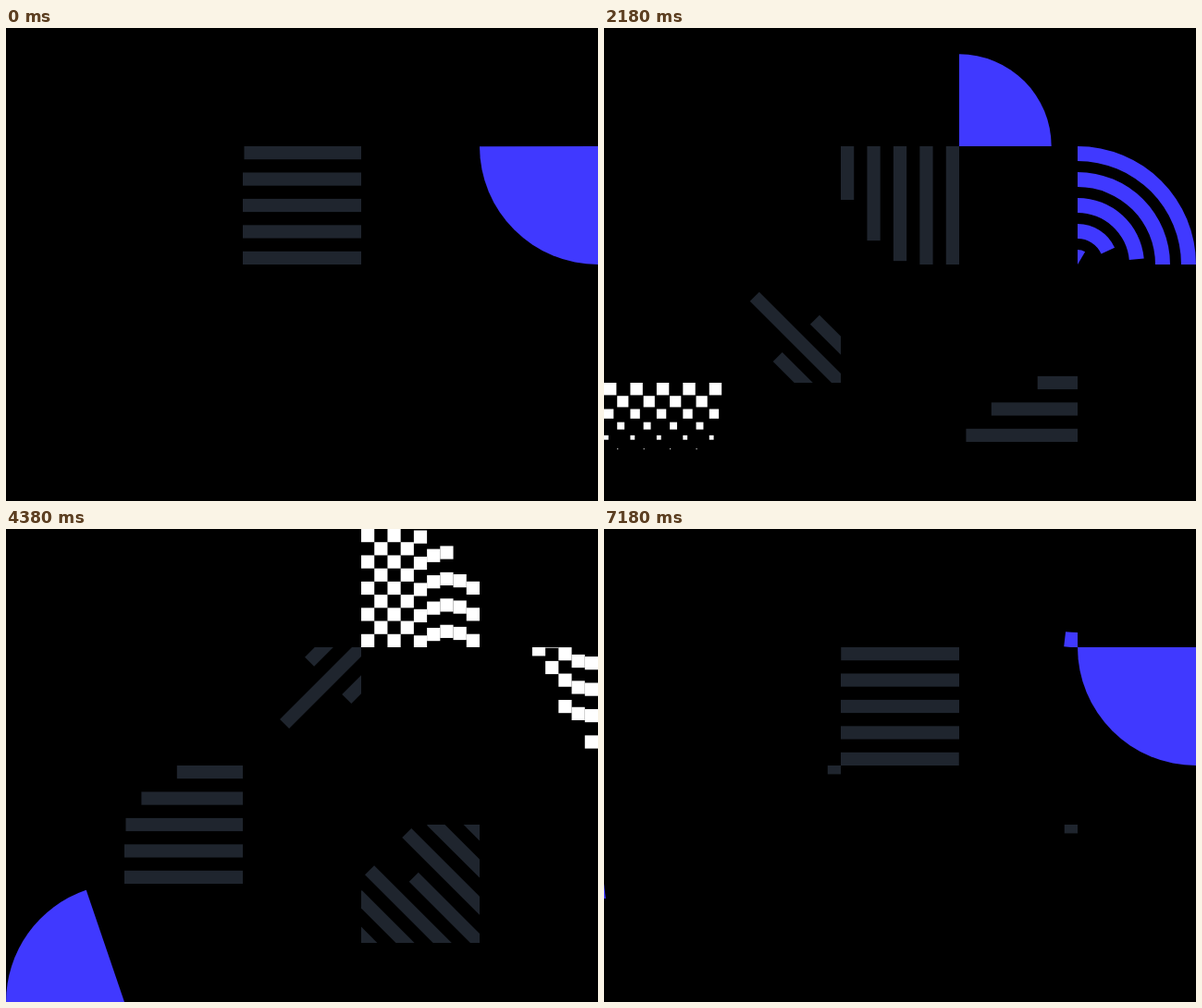
Recreate the animation shown at these times as an HTML page with a canvas. Size 640 by 512 pixels, loop 7200 ms.

```html
<!DOCTYPE html>
<html lang="en">
<head>
<meta charset="utf-8">
<title>Pattern tiles</title>
<style>
  html, body { margin: 0; width: 100%; height: 100%; overflow: hidden; background: #000; }
  canvas { display: block; width: 640px; height: 512px; }
</style>
</head>
<body>
<canvas id="stage" width="640" height="512"></canvas>
<script>
const ctx = document.getElementById('stage').getContext('2d');
const DARK = '#1f252e', BLUE = '#4039ff', WHITE = '#fff';
const LOOP = 7200, SLOT = 1200, SIZE = 128, UNIT = SIZE / 9;
const LEAVE = 574, SPAN = 286, POWER = 2.15;
const QUARTER = Math.PI / 2;

const clamp = v => Math.max(0, Math.min(1, v));
const enter = (t, dur = SPAN, p = POWER) => 1 - Math.pow(1 - clamp(t / dur), p);
const leave = (t, dur = SPAN, p = POWER) => Math.pow(clamp(t / dur), p);

// Start and end of the visible part of one element, as fractions
const visible = (t, delayIn, delayOut = delayIn) =>
  [leave(t - LEAVE - delayOut), enter(t - delayIn)];

const transpose = () => ctx.transform(0, 1, 1, 0, 0, 0);

function sector(outer, inner, from, to) {
  if (to - from < 1e-4 || outer <= 0) return;
  ctx.beginPath();
  ctx.arc(0, 0, outer, from * QUARTER, to * QUARTER);
  if (inner > 0) ctx.arc(0, 0, inner, to * QUARTER, from * QUARTER, true);
  else ctx.lineTo(0, 0);
  ctx.fill();
}

function bars(t) {
  ctx.fillStyle = DARK;
  for (let i = 0; i < 5; i++) {
    const [a, b] = visible(t, i * 80);
    ctx.fillRect(a * SIZE, i * 2 * UNIT, (b - a) * SIZE, UNIT);
  }
}

function rings(t, innerFirst) {
  ctx.fillStyle = BLUE;
  for (let i = 0; i < 5; i++) {
    const [a, b] = visible(t, 80 * (innerFirst ? 4 - i : i));
    const r = SIZE - 28 * i;
    sector(r, r - 16, a, b);
  }
}

function ringsBack(t) {
  transpose();
  rings(t, true);
}

function discScale(t) {
  ctx.fillStyle = BLUE;
  sector(SIZE * (enter(t, 600, 3.5) - leave(t - 580, 600, 3.5)), 0, 0, 1);
}

function discWedge(t) {
  transpose();
  ctx.fillStyle = BLUE;
  sector(SIZE, 0, leave(t - 572, 410), enter(t, 410));
}

function diagonals(t, middleLeavesFirst) {
  const length = SIZE * Math.SQRT2;
  ctx.fillStyle = DARK;
  ctx.rotate(Math.PI / 4);
  for (let k = -3; k <= 3; k++) {
    const n = Math.abs(k);
    const [a, b] = middleLeavesFirst
      ? visible(t, 80 * (3 - n), 80 * n)
      : visible(t, 80 * (n + 1), 80 * (3 - n));
    const start = Math.max(0, n * 2 * UNIT - UNIT / 2);
    const len = length - 2 * start;
    ctx.fillRect(start + a * len, (2 * k - 0.5) * UNIT, (b - a) * len, UNIT);
  }
}

const diagonalsBack = t => diagonals(t, true);

function checkerSlide(t) {
  ctx.fillStyle = WHITE;
  for (let r = 0; r < 9; r++) {
    const [a, b] = visible(t, r * 40);
    const shift = (a + b - 1) * SIZE;
    for (let c = r % 2; c < 9; c += 2) {
      ctx.fillRect(c * UNIT + shift, r * UNIT, UNIT, UNIT);
    }
  }
}

function checkerShrink(t) {
  ctx.fillStyle = WHITE;
  for (let r = 0; r < 9; r++) {
    const [a, b] = visible(t, (8 - r) * 40);
    const side = UNIT * Math.max(0, b - a);
    for (let c = r % 2; c < 9; c += 2) {
      ctx.fillRect(c * UNIT, r * UNIT, side, side);
    }
  }
}

// Each tile: place, start time, then six [shape, quarter turns] in order
const tiles = [
  { x: 256, y: 128, start: 590, shapes: [[rings, 3], [bars, 1], [checkerSlide, 1], [diagonals, 1], [discScale, 1], [bars, 0]] },
  { x: 512, y: 128, start: 610, shapes: [[bars, 0], [rings, 3], [bars, 1], [checkerSlide, 1], [diagonals, 1], [discWedge, 1]] },
  { x: 384, y: 0, start: 10, shapes: [[bars, 0], [discScale, 3], [diagonals, 1], [checkerSlide, 1], [bars, 1], [ringsBack, 1]] },
  { x: 0, y: 384, start: 10, shapes: [[bars, 2], [checkerShrink, 0], [diagonalsBack, 2], [discWedge, 2], [bars, 1], [rings, 0]] },
  { x: 128, y: 256, start: 10, shapes: [[discScale, 2], [diagonals, 0], [checkerSlide, 0], [bars, 0], [ringsBack, 0], [bars, 3]] },
  { x: 384, y: 320, start: 10, shapes: [[rings, 2], [bars, 0], [checkerShrink, 0], [diagonalsBack, 0], [discWedge, 2], [bars, 3]] }
];

function drawTile(tile, now) {
  const t = (now - tile.start + LOOP) % LOOP;
  const [shape, turns] = tile.shapes[Math.floor(t / SLOT)];
  ctx.save();
  ctx.beginPath();
  ctx.rect(tile.x, tile.y, SIZE, SIZE);
  ctx.clip();
  ctx.translate(tile.x + SIZE / 2, tile.y + SIZE / 2);
  ctx.rotate(turns * QUARTER);
  ctx.translate(-SIZE / 2, -SIZE / 2);
  shape(t % SLOT);
  ctx.restore();
}

let origin = null;
function frame(now) {
  if (origin === null) origin = now;
  const time = Math.max(0, now - origin) % LOOP;
  ctx.fillStyle = '#000';
  ctx.fillRect(0, 0, 640, 512);
  for (const tile of tiles) drawTile(tile, time);
  requestAnimationFrame(frame);
}
requestAnimationFrame(frame);
</script>
</body>
</html>
```
